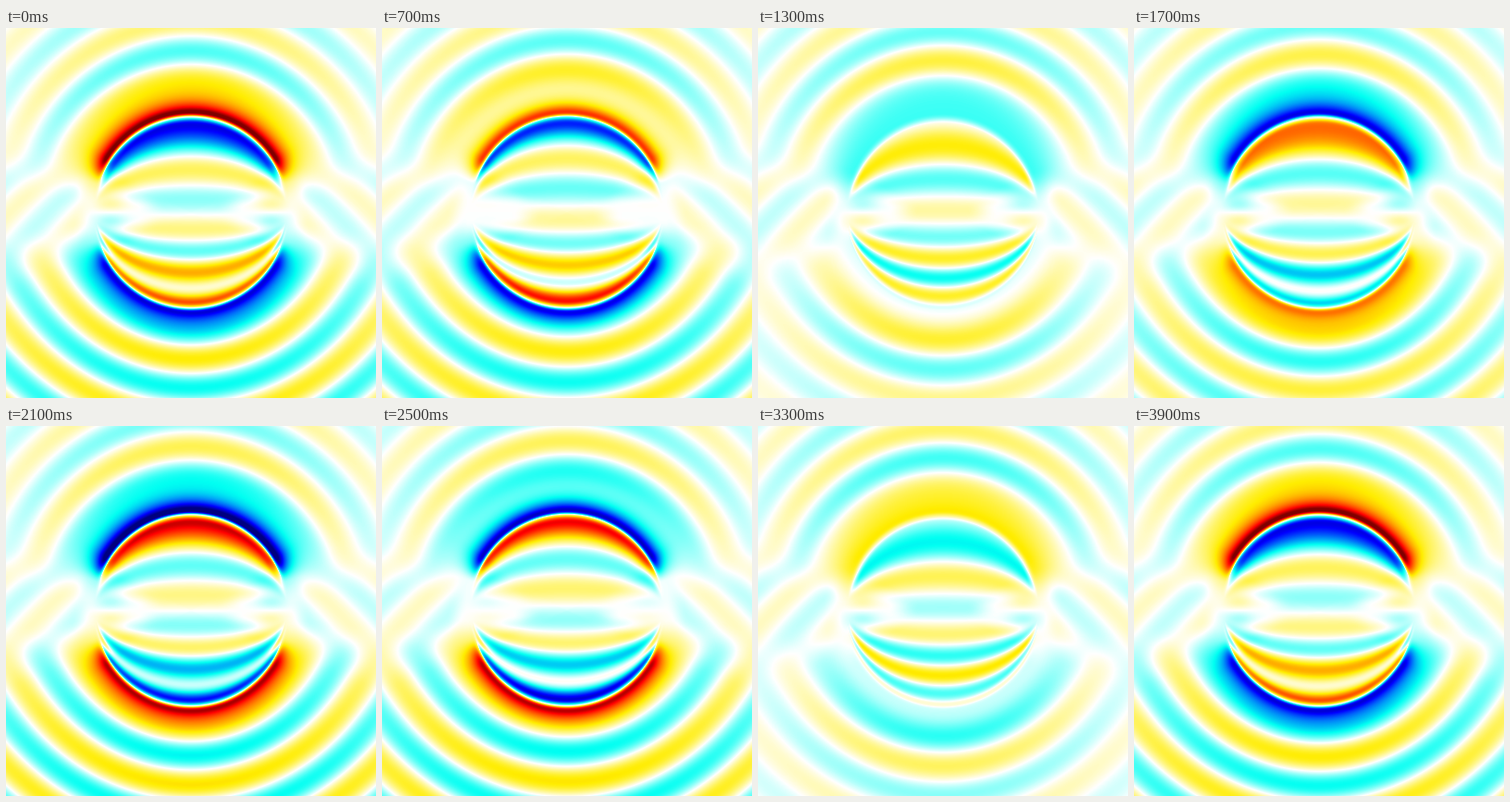
A matplotlib script that plays this animation: 400 by 400 pixels, repeating every 4000 ms.

```python
import numpy as np
import matplotlib.pyplot as plt
from matplotlib.animation import FuncAnimation
from matplotlib.colors import LinearSegmentedColormap

SIZE = 400
FRAMES = 40
INTERVAL = 100
RIM = 104  # radius of the cylinder


def smooth(lo, hi, x):
    t = np.clip((x - lo) / (hi - lo), 0, 1)
    return t * t * (3 - 2 * t)


def ramp(x, w=8):
    """Zero for negative x, bending softly into a straight line."""
    return w * np.logaddexp(0, x / w)


def wave(real_amp, imag_amp, degrees):
    q = np.radians(degrees)
    return -real_amp * np.sin(q) + 1j * imag_amp * np.cos(q)


def inner_wave(s):
    """Rising wave whose fronts crowd together towards the bottom."""
    amp = .12 + .2 * np.sin(np.pi * s / 140) ** 2
    return wave(amp, amp, 6.28 * s - .0163 * s ** 2 - 372)


def upper_wave(r, c):
    amp = .28 * np.exp(-ramp(r - 150) / 130) * c ** smooth(105, 150, r)
    return wave(amp, amp, 5.9 * ramp(r - 139) - 155)


def lower_wave(r, c):
    """Converging wave, partly standing, so its two phases differ in size."""
    fade = smooth(105, 150, r)
    standing = (.28 + .08 * fade) * c ** (.6 * fade)
    moving = .28 * np.exp(-ramp(r - 139) / 100) * c ** (1.1 * fade)
    return wave(standing, moving, 100 - 5.6 * ramp(r * c ** .07 - 121))


def rim_layer(d, top):
    """Strong field of opposite sign on either side of the rim."""
    outside = (1.5 + .2 * top) * np.tanh(d / 4) * np.exp(-np.abs(d) / 11)
    inside = 1.2 * np.tanh(d / 7) * np.exp(-np.abs(d) / 20)
    return top * np.where(d > 0, outside, inside)


def build_field():
    cols, rows = np.meshgrid(np.arange(SIZE) + .5, np.arange(SIZE) + .5)
    x, y = cols - 200, 199.3 - rows
    r = np.hypot(x, y) + 1e-6
    c = np.abs(y) / r + 1e-6
    top = np.sign(y)

    # Elliptic fronts inside that become the rim circle at s = RIM
    s = y / np.sqrt(np.maximum(1 - (x / RIM) ** 2, .02))
    s = np.clip(s, -RIM, RIM)

    outer = np.where(y > 0, upper_wave(r, c), lower_wave(r, c))
    out = smooth(96, 107, r)
    main = inner_wave(s) * (1 - out) + outer * out
    weight = 1 - (1 - smooth(.08, .42, c)) * smooth(25, 60, r)

    d = np.where(r < RIM, np.abs(s), r) - RIM
    layer = rim_layer(d, top) * smooth(.28, .55, c)

    # Faint patterns along the horizontal axis
    wings = (.1 - .13j) * np.sin(np.pi * y / 26)
    wings = wings * np.exp(-(y / 22) ** 2 - ((np.abs(x) - 87) / 18) ** 2)
    side = .08 * np.exp(1j * np.radians(24 + 4.3 * (r - 125) + 4.2 * y))
    side = side * (1 - weight) * smooth(105, 130, r)

    return main * weight + layer + wings + side


cmap = LinearSegmentedColormap.from_list("wave", [
    (0, (0, 0, .5)), (.11, (0, 0, 1)), (.335, (0, 1, .95)),
    (.5, (1, 1, 1)),
    (.665, (1, .93, 0)), (.91, (1, 0, 0)), (1, (.5, 0, 0)),
], N=512)

field = build_field()
fig = plt.figure(figsize=(4, 4), dpi=100)
ax = fig.add_axes([0, 0, 1, 1])
ax.axis("off")
image = ax.imshow(field.real, cmap=cmap, vmin=-1, vmax=1,
                  interpolation="nearest", aspect="auto")


def update(i):
    # The last picture completes the cycle and equals the first
    turn = 2 * np.pi * i / (FRAMES - 1) - np.radians(30)
    image.set_data((field * np.exp(-1j * turn)).real)
    return [image]


anim = FuncAnimation(fig, update, frames=FRAMES, interval=INTERVAL,
                     repeat=True, repeat_delay=0, blit=False)
plt.show()
```
